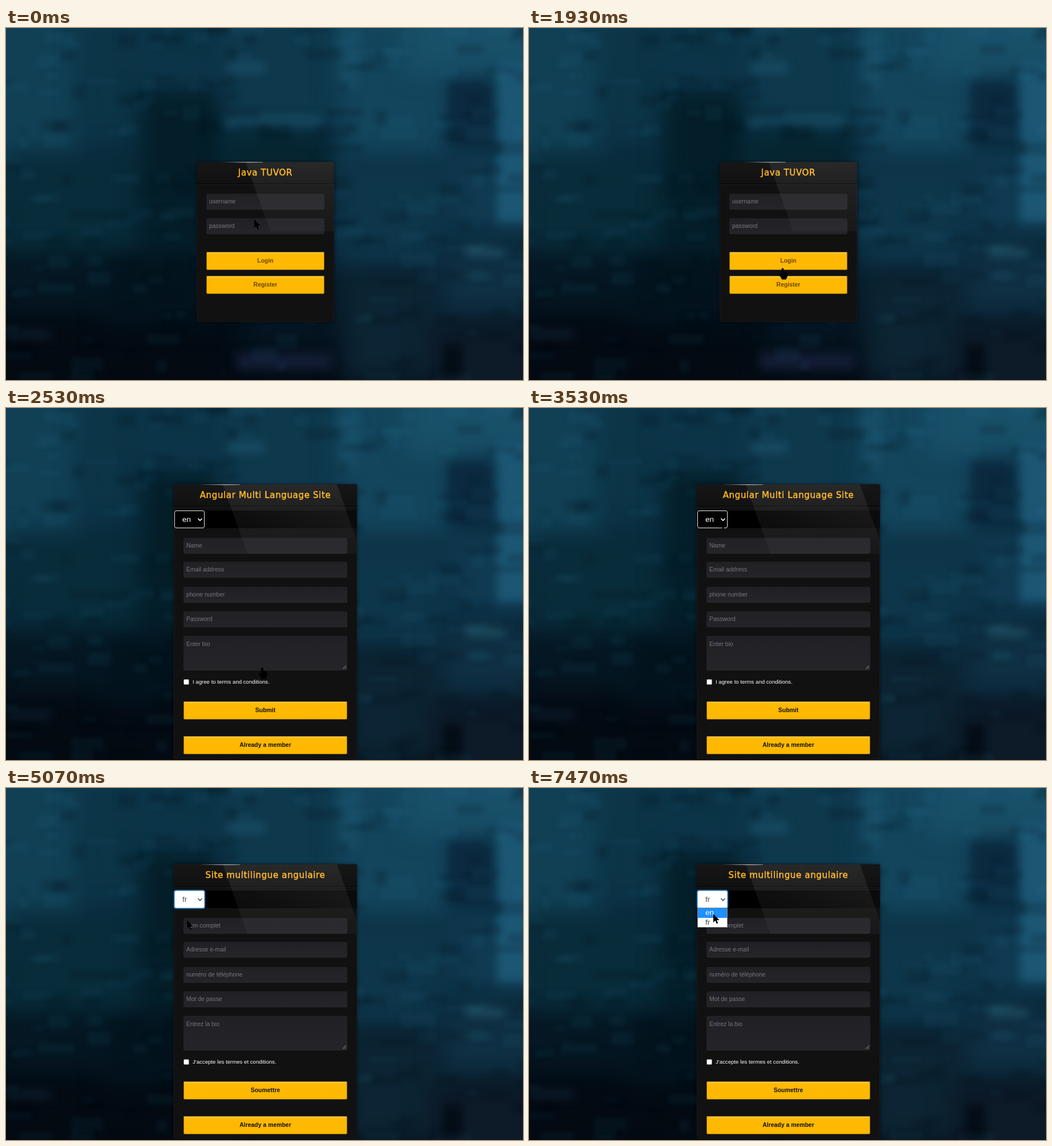
An HTML page with a canvas that plays this animation: 906x618 px, repeating every 8000 ms.

```html
<!DOCTYPE html>
<html lang="en">
<head>
<meta charset="utf-8">
<title>Sign-up form</title>
<style>
html, body { margin: 0; width: 100%; height: 100%; overflow: hidden; background: #06202c; }
#stage { position: relative; width: 906px; height: 618px; overflow: hidden;
  font: 10.45px "Liberation Sans", Arial, sans-serif; }
#stage div, #stage svg, #stage canvas { position: absolute; box-sizing: border-box; white-space: pre; }
.card { background: #111; border-radius: 3px; box-shadow: 0 0 5px rgba(0,0,0,.6), inset 0 0 0 1px rgba(40,32,36,.45); overflow: hidden; }
.head { background: linear-gradient(#161616, #111); border-bottom: 1px solid #000; box-shadow: 0 1px 0 #1c1c1d; }
.title { color: #fdb51c; text-align: center; font: 15px "DejaVu Sans", sans-serif;
  letter-spacing: .65px; -webkit-text-stroke: .5px #fdb51c; }
.field { background: linear-gradient(#202025, #252529); border-radius: 3px; color: #75767c; padding-left: 5px; }
.field.lit { background: #29292a; }
.button { background: linear-gradient(#ffc526, #feb903 18%, #feb800); border-radius: 3px; text-align: center;
  font-weight: bold; box-shadow: inset 0 0 0 1px rgba(95,68,16,.7), inset 0 2px 0 #ffcf4d; color: #111; }
#login .button { color: #6f4707; }
.bar { background: linear-gradient(90deg, #000 40%, #0b0b0b); }
.glow { height: 2px; background: radial-gradient(ellipse at 70% 0, rgba(255,255,255,.85), transparent 65%); }
.shine { pointer-events: none; }
.agree { color: #fff; font-size: 9.65px; }
.check { background: #fff; border: 1px solid #767676; border-radius: 2px; }
.select { font-size: 13.5px; color: #fff; background: #000; border: 1px solid #e8e8e8; border-radius: 3px; padding-left: 13px; }
.select.on { color: #495057; background: #fff; border-color: #8fc4f4; box-shadow: 0 0 0 1.5px rgba(32,120,190,.75); }
.list { background: #fff; border: 1px solid #7d8790; }
.option { font-size: 13.5px; color: #444; padding-left: 13px; }
.option.on { background: #1e90ff; color: #fff; }
</style>
</head>
<body>
<div id="stage"></div>
<script>
const stage = document.getElementById('stage');

function add(parent, cls, x, y, w, h, text = '', line = h) {
  const el = document.createElement('div');
  el.className = cls;
  el.style.cssText = `left:${x}px;top:${y}px;width:${w}px;height:${h}px;line-height:${line}px`;
  el.textContent = text;
  parent.append(el);
  return el;
}

function svg(parent, x, y, w, h, inner) {
  parent.insertAdjacentHTML('beforeend',
    `<svg width="${w}" height="${h}" style="left:${x}px;top:${y}px;overflow:visible">${inner}</svg>`);
  return parent.lastElementChild;
}

// Soft city backdrop: x, y, width, height, colour
const masses = [
  [-60, -60, 190, 300, '#114055'], [130, -60, 110, 250, '#0c3547'], [0, 220, 230, 170, '#092c3a'],
  [235, 110, 150, 320, '#041e29'], [235, -60, 150, 130, '#0b3346'], [385, -60, 190, 240, '#0e384c'],
  [385, 185, 195, 120, '#062531'], [580, -60, 200, 290, '#13455d'], [700, -60, 260, 140, '#185069'],
  [580, 230, 200, 190, '#0e364a'], [780, 220, 180, 150, '#103a51'], [-60, 400, 230, 120, '#051722'],
  [-60, 500, 460, 180, '#030a12'], [170, 400, 220, 120, '#03131d'], [590, 430, 180, 190, '#0c2433'],
  [760, 380, 200, 130, '#0f2f42'], [740, 520, 200, 140, '#0d1b29']
];
const details = [
  [775, 95, 75, 110, '#0b2a40'], [860, 60, 60, 280, '#1b5673'], [585, 0, 32, 110, '#174c64'],
  [385, 152, 168, 20, '#15465c'], [390, 58, 64, 22, '#174960'], [20, 165, 110, 20, '#124156'],
  [805, 382, 70, 20, '#1c4a5d'], [405, 570, 165, 30, '#131c33'], [765, 555, 35, 70, '#040d16'],
  [0, 530, 80, 16, '#0a1a27']
];

function seeded(seed) {
  return () => (seed = (seed * 16807) % 2147483647) / 2147483647;
}

function paintBackdrop() {
  const canvas = document.createElement('canvas');
  canvas.width = 906;
  canvas.height = 618;
  stage.append(canvas);
  const c = canvas.getContext('2d');
  const base = c.createLinearGradient(0, 0, 0, 618);
  base.addColorStop(0, '#103b50');
  base.addColorStop(.55, '#08283a');
  base.addColorStop(1, '#030b14');
  c.fillStyle = base;
  c.fillRect(0, 0, 906, 618);
  const fill = (rects, blur) => {
    c.filter = `blur(${blur}px)`;
    for (const [x, y, w, h, color] of rects) {
      c.fillStyle = color;
      c.fillRect(x, y, w, h);
    }
  };
  const random = seeded(41);
  const mottle = Array.from({ length: 240 }, (_, i) => [
    random() * 940 - 40, random() * 640 - 20, 15 + random() * 50, 6 + random() * 18,
    i % 2 ? 'rgba(50,125,155,.09)' : 'rgba(0,8,18,.16)'
  ]);
  fill(masses, 20);
  fill(details, 8);
  fill(mottle, 4);
}

function card(id, x, y, w, h, title) {
  const el = add(stage, 'card', x, y, w, h);
  el.id = id;
  add(el, 'head', 0, 0, w, 39);
  const name = add(el, 'title', 0, 0, w, 38, title);
  return { el, name };
}

// Slanted gloss over the upper part of a card
function gloss(parent, left, id) {
  add(parent, 'glow', left - 50, 0, 80, 2);
  svg(parent, 0, 0, 330, 125, `<defs><linearGradient id="${id}" x2="0" y2="1">
    <stop stop-color="#fff" stop-opacity=".08"/><stop offset="1" stop-color="#fff" stop-opacity=".03"/></linearGradient></defs>
    <path d="M${left} 0Q${left + 21} 60 ${left + 43} 122H${left + 243}Q${left + 221} 60 ${left + 200} 0Z" fill="url(#${id})"/>`)
    .classList.add('shine');
}

const words = {
  en: ['Angular Multi Language Site', 'Name', 'Email address', 'phone number', 'Password', 'Enter bio',
    'I agree to terms and conditions.', 'Submit'],
  fr: ['Site multilingue angulaire', 'nom complet', 'Adresse e-mail', 'numéro de téléphone', 'Mot de passe',
    'Entrez la bio', "J'accepte les termes et conditions.", 'Soumettre']
};

paintBackdrop();

const login = card('login', 334, 235, 241, 281, 'Java TUVOR');
const user = add(login.el, 'field', 17, 56, 207, 28, 'username');
add(login.el, 'field', 17, 99, 207, 28, 'password');
add(login.el, 'button', 17, 158, 207, 32, 'Login', 31);
add(login.el, 'button', 17, 200, 207, 32, 'Register', 31);
gloss(login.el, 86, 'g1');

const form = card('form', 294, 134, 321, 482, words.en[0]);
add(form.el, 'bar', 0, 46, 321, 31);
const labels = [form.name];
for (const y of [94, 136, 180, 223]) labels.push(add(form.el, 'field', 17, y, 287, 28, '', 27));
labels.push(add(form.el, 'field', 17, 266, 287, 61, '', 30));
svg(form.el, 295, 317, 8, 8, '<path d="M1 7L7 1M4.5 7L7 4.5" stroke="#aaa" stroke-width=".9"/>');
add(form.el, 'check', 17, 342, 10, 10);
labels.push(add(form.el, 'agree', 33, 339, 240, 16));
labels.push(add(form.el, 'button', 17, 381, 287, 32, '', 31));
add(form.el, 'button', 17, 442, 287, 32, 'Already a member', 31);
gloss(form.el, 86, 'g2');

const picker = add(stage, 'select', 295, 180, 53, 31, '', 29);
const value = document.createElement('span');
picker.append(value);
svg(picker, 39, 11, 10, 8, '<path d="M1.5 2L5 5.6L8.5 2" fill="none" stroke="currentColor" stroke-width="1.7"/>');
const list = add(stage, 'list', 295, 210, 53, 35);
const options = ['en', 'fr'].map((code, i) => add(list, 'option', 0, i * 16.5, 51, 16.5, code, 16));

const arrow = svg(stage, 0, 0, 12, 18, '<path d="M0 0V15L3.4 11.8L5.8 17.2L8.2 16.1L5.9 11H10.6Z"/>');
const hand = svg(stage, 0, 0, 16, 20,
  '<path d="M-2 1.5Q-2-.5-.2-.5T1.8 1.5V5.5Q3.2 4.8 4.2 6.2Q5.6 5.6 6.4 7Q8.2 6.8 8.4 9V13Q8.2 16 6.4 17.5V19.5H-2V18L-6 12Q-7 10-5.4 9.4Q-4 9-2 11Z"/>');

// Pointer path: time, x, y
const path = [
  [0, 435, 336], [690, 435, 336], [930, 433, 303], [1330, 433, 303], [1400, 432, 325], [2200, 449, 456],
  [2590, 449, 456], [2930, 385, 228], [3150, 385, 228], [3530, 334, 196], [4400, 334, 196],
  [4730, 317, 232], [5200, 317, 232], [5460, 362, 222], [5670, 338, 197], [7150, 338, 197],
  [7470, 323, 221], [8000, 323, 221]
];

function pointerAt(t) {
  const i = path.findIndex((p, n) => n && t <= p[0]);
  const [t0, x0, y0] = path[i - 1], [t1, x1, y1] = path[i];
  const u = (t - t0) / (t1 - t0), k = u * u * (3 - 2 * u);
  return [x0 + (x1 - x0) * k, y0 + (y1 - y0) * k];
}

const between = (v, a, b) => v >= a && v < b;
const show = (el, on) => { el.style.visibility = on ? 'visible' : 'hidden'; };

function render(time) {
  const step = 200 / 3;
  const t = Math.min(Math.floor((time + 5) / step) * step, 8000);
  const signup = t >= 2525;
  const lang = t >= 4860 ? 'fr' : 'en';
  const open = between(t, 3790, 4860) || t >= 6195;
  const focus = t >= 3790;
  const pick = between(t, 4600, 7300) ? 1 : 0;
  const [x, y] = pointerAt(t);
  const pointing = signup ? t < 2660 : between(y, 393, 425) || between(y, 435, 467);

  show(login.el, !signup);
  show(form.el, signup);
  show(picker, signup);
  show(list, open);
  labels.forEach((el, i) => { el.textContent = words[lang][i]; });
  value.textContent = lang;
  picker.classList.toggle('on', focus);
  options.forEach((el, i) => el.classList.toggle('on', i === pick));
  user.classList.toggle('lit', between(t, 1390, 1600));
  show(arrow, !pointing);
  show(hand, pointing);
  for (const el of [arrow, hand]) el.style.transform = `translate(${x}px,${y}px)`;
}

const start = performance.now();
function tick() {
  render((performance.now() - start) % 8000);
  requestAnimationFrame(tick);
}
tick();
</script>
</body>
</html>
```
